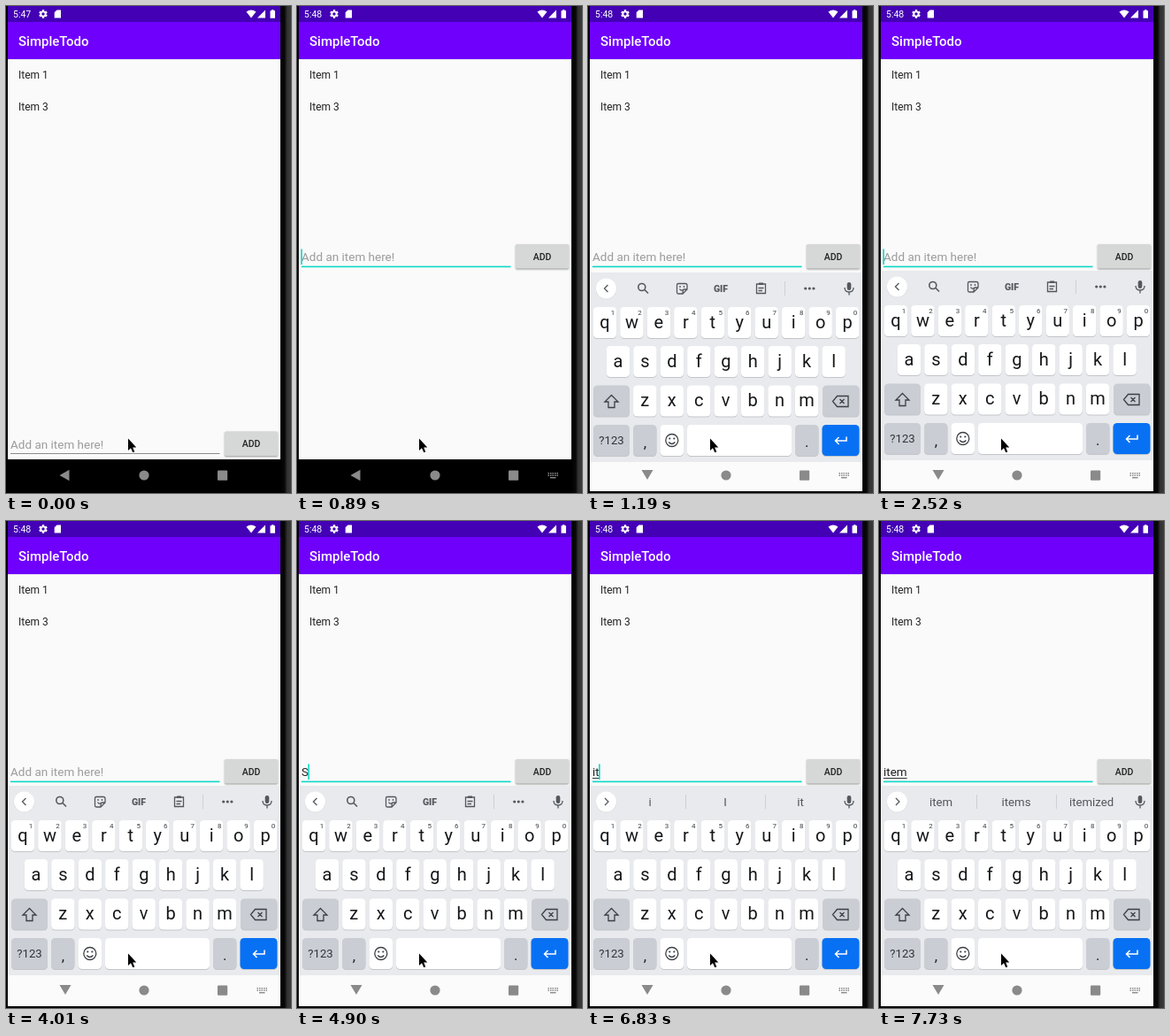
An HTML page with a canvas that plays this animation: 322 by 550 pixels, repeating every 8 s.

```html
<!DOCTYPE html>
<html lang="en">
<head>
<meta charset="utf-8">
<title>Todo app</title>
<style>
html, body { margin: 0; width: 322px; height: 550px; overflow: hidden; background: #000; }
canvas { display: block; width: 322px; height: 550px; }
</style>
</head>
<body>
<canvas id="stage"></canvas>
<script>
const canvas = document.getElementById('stage');
const c = canvas.getContext('2d');
const scale = window.devicePixelRatio || 1;
canvas.width = 322 * scale;
canvas.height = 550 * scale;

const LOOP = 8000;
const TEAL = '#0ad8c8', ICON = '#54585d', INK = '#3c4045';

// Each timeline holds [start time, value] pairs.
const clock = [[0, '5:47'], [290, '5:48']];
const caret = [[0, 0], [590, 1], [1040, 0], [1640, 1], [2080, 0], [2520, 1], [3120, 0],
  [3560, 1], [4010, 0], [4610, 1], [6240, 0], [6390, 1], [7730, 0]];
const typed = [[0, ''], [4900, 'S'], [5490, ''], [6390, 'i'], [6830, 'it'], [7130, 'ite'], [7280, 'item']];
const hints = [[0, ''], [5050, 'S So She'], [5640, ''], [6530, 'i I it'], [6980, 'it It its'],
  [7280, 'item items itemized']];
const slide = [[0, null], [1040, 9], [1190, 2], [1340, 0]];
const at = (line, t) => line.findLast(([start]) => t >= start)[1];

function rect(x, y, w, h, fill) {
  c.fillStyle = fill;
  c.fillRect(x, y, w, h);
}
function round(x, y, w, h, r, fill) {
  c.fillStyle = fill;
  c.beginPath();
  c.roundRect(x, y, w, h, r);
  c.fill();
}
function disc(x, y, r, fill) {
  c.fillStyle = fill;
  c.beginPath();
  c.arc(x, y, r, 0, 7);
  c.fill();
}
function text(s, x, y, size, fill, align = 'left', weight = 400) {
  c.font = `${weight} ${size}px Roboto, sans-serif`;
  c.textAlign = align;
  c.fillStyle = fill;
  c.fillText(s, x, y);
}
function fillPath(d, fill) {
  c.fillStyle = fill;
  c.fill(new Path2D(d));
}
function line(d, color, width = 1.3) {
  c.strokeStyle = color;
  c.lineWidth = width;
  c.stroke(new Path2D(d));
}

function drawFrame() {
  rect(0, 0, 322, 550, '#000');
  const edge = c.createLinearGradient(310, 0, 322, 0);
  [[0, '#000'], [.4, '#080808'], [.65, '#333'], [1, '#3a3a3a']]
    .forEach(stop => edge.addColorStop(...stop));
  rect(310, 0, 12, 550, edge);
  rect(2, 60, 308, 452, '#fafafa');
}

function drawHeader(t) {
  rect(2, 0, 308, 18, '#4300b5');
  rect(2, 18, 308, 42, '#6f00fb');
  rect(2, 60, 308, 1, '#ebe8f0');
  text(at(clock, t), 8, 13, 10.5, '#fff');
  for (let i = 0; i < 3; i++) {
    c.save();
    c.translate(42, 9);
    c.rotate(i * Math.PI / 3);
    rect(-1.2, -4.8, 2.4, 9.6, '#fff');
    c.restore();
  }
  disc(42, 9, 3.5, '#fff');
  disc(42, 9, 1.7, '#4300b5');
  fillPath('M57.5 4.5H62V13.5H54.7V7.3Z', '#fff');
  fillPath('M271.5 6.5Q277 2.5 282.5 6.5L277 13.5Z', '#fff');
  fillPath('M293 4.5V13.5H284Z', '#fff');
  fillPath('M298.5 5.3H300V4.2H302.5V5.3H304V13.7H298.5Z', '#fff');
  text('SimpleTodo', 14, 45, 15, '#fff', 'left', 500);
  text('Item 1', 14, 82.4, 12, '#222');
  text('Item 3', 14, 118.4, 12, '#222');
}

function drawInput(t) {
  const y = t < 890 ? 211.5 : 0;
  const value = at(typed, t);
  text(value || 'Add an item here!', 5, 288 + y, 13.5, value ? '#222' : '#9c9c9c');
  const end = 5 + (value ? c.measureText(value).width : 0);
  if (value && at(hints, t)) rect(5, 290, end - 5, 1, '#333');
  if (t < 590) rect(5, 505, 236.5, 1, '#8b8b8b');
  else rect(5, 293.6 + y, 236.5, 1.6, TEAL);
  if (at(caret, t)) rect(end - .6, 274.5 + y, 1.6, 17.5, TEAL);

  c.save();
  c.shadowColor = '#0006';
  c.shadowBlur = 2 * scale;
  c.shadowOffsetY = scale;
  round(247, 269 + y, 60, 27.5, 1.5, '#d6d7d7');
  c.restore();
  text('ADD', 277, 286.7 + y, 10.5, '#222', 'center', 500);
}

function drawTools() {
  line('M64 318.500L68 322.500M64.800 315.500A4 4 0 1 1 56.800 315.500A4 4 0 1 1 64.800 315.500', ICON, 1.6);
  line('M102 311.500H110Q112 311.500 112 313.500V318L107 323H102Q100.500 323 100.500 321.500V313Q100.500 311.500 102 311.500M112 318H108.500Q107 318 107 323M103.500 317.500Q105 320 107 318.500', ICON);
  disc(104, 315, .9, ICON);
  disc(108.5, 315, .9, ICON);
  text('GIF', 150, 320.7, 10.5, ICON, 'center', 900);
  line('M190.500 312H200.500V322.500H190.500ZM192.500 316.500H198.500M192.500 319.500H197', ICON);
  rect(193, 310.5, 5, 2.5, ICON);
  rect(222, 309, 1, 16, '#cdd0d4');
  for (const x of [245.7, 250.3, 254.9]) disc(x, 317, 1.6, ICON);
}

function drawStrip(t) {
  const words = at(hints, t);
  disc(20.5, 317.5, 11.8, '#d5d7da');
  disc(20.5, 317, 11.5, '#fff');
  line(words ? 'M19 313L23 317L19 321' : 'M22.500 313L18.500 317L22.500 321', ICON);
  if (words) {
    words.split(' ').forEach((word, i) => text(word, 70 + 85 * i, 322, 13.2, '#53575c', 'center'));
    rect(110, 309, 1, 16, '#cdd0d4');
    rect(200, 309, 1, 16, '#cdd0d4');
  } else drawTools();
  round(292.7, 310, 4.6, 9, 2.3, ICON);
  line('M290 316Q290 321 295 321Q300 321 300 316M295 321V324.500', ICON);
}

function key(x, y, w, fill = '#fff') {
  round(x, y + 1, w, 35, 4.5, '#c3c5c9');
  round(x, y, w, 35, 4.5, fill);
}

function drawKeyboard(t, drop) {
  const upper = t >= 4760 && t < 4900;
  const dark = '#cacdd3';
  c.save();
  c.translate(0, drop);
  rect(2, 299, 308, 214, '#e8eaed');
  drawStrip(t);
  [['qwertyuiop', 19, 338], ['asdfghjkl', 34, 382], ['zxcvbnm', 64.3, 426.5]].forEach(([row, x0, y]) => {
    [...row].forEach((letter, i) => {
      const x = x0 + 30.45 * i;
      key(x - 13.2, y, 26.4);
      text(upper ? letter.toUpperCase() : letter, x, y + 23.5, 20, '#161719', 'center');
      if (y === 338) text((i + 1) % 10, x + 9, 347, 8, INK, 'center');
    });
  });

  key(6, 426.5, 41, dark);
  const shift = 'M26.500 437.500L34 445H30V451.500H23V445H19Z';
  if (upper) fillPath(shift, INK);
  line(shift, INK);
  key(265, 426.5, 41.5, dark);
  line('M281.500 438.500H294V450.500H281.500L276.500 444.500ZM284.500 442L289.500 447M289.500 442L284.500 447', INK);

  key(6, 471, 41, dark);
  text('?123', 26.5, 493, 13.2, '#303338', 'center');
  key(51, 471, 26.5, dark);
  text(',', 64.5, 497, 17, '#222', 'center');
  key(81.5, 471, 26.5);
  line('M101.800 488.500A7 7 0 1 1 87.800 488.500A7 7 0 1 1 101.800 488.500M91.200 490.500Q94.800 494.500 98.400 490.500', INK);
  disc(92.3, 486.5, 1.1, INK);
  disc(97.3, 486.5, 1.1, INK);
  key(112, 471, 118);
  key(234, 471, 26.5, dark);
  text('.', 247.3, 496, 17, '#222', 'center');
  key(264.5, 471, 42, '#0871f3');
  line('M292 484.500V489H279.500M283.500 485L279.500 489L283.500 493', '#fff', 1.5);
  c.restore();
}

function drawNav(t, drop) {
  const gray = '#8a8a8a';
  if (drop !== null) rect(2, 513 + drop, 308, 35 - drop, '#fbfbfb');
  fillPath(t < 1190 ? 'M60.500 530L71.500 523.800V536.200Z' : 'M60.500 524H73.500L67 535Z', gray);
  disc(156, 530, 5.6, gray);
  round(239, 524.5, 11.2, 11.2, 1, gray);
  if (t < 740) return;
  for (let i = 0; i < 10; i++) rect(283.5 + i % 5 * 2.5, 527 + 2.4 * (i / 5 | 0), 1.5, 1.5, gray);
  rect(286, 532, 6.5, 1.4, gray);
}

function drawPointer() {
  const arrow = 'M138 488.500V502L141 499.300L143.300 504.300L145.300 503.400L143.200 498.500H147.300Z';
  c.lineJoin = 'round';
  line(arrow, '#fff', 2);
  fillPath(arrow, '#000');
  c.lineJoin = 'miter';
}

function draw(now) {
  const t = now % LOOP;
  const drop = at(slide, t);
  c.setTransform(scale, 0, 0, scale, 0, 0);
  drawFrame();
  drawHeader(t);
  drawInput(t);
  if (drop !== null) drawKeyboard(t, drop);
  drawNav(t, drop);
  drawPointer();
}

const start = performance.now();
function tick() {
  draw(performance.now() - start);
  requestAnimationFrame(tick);
}
tick();
</script>
</body>
</html>
```
